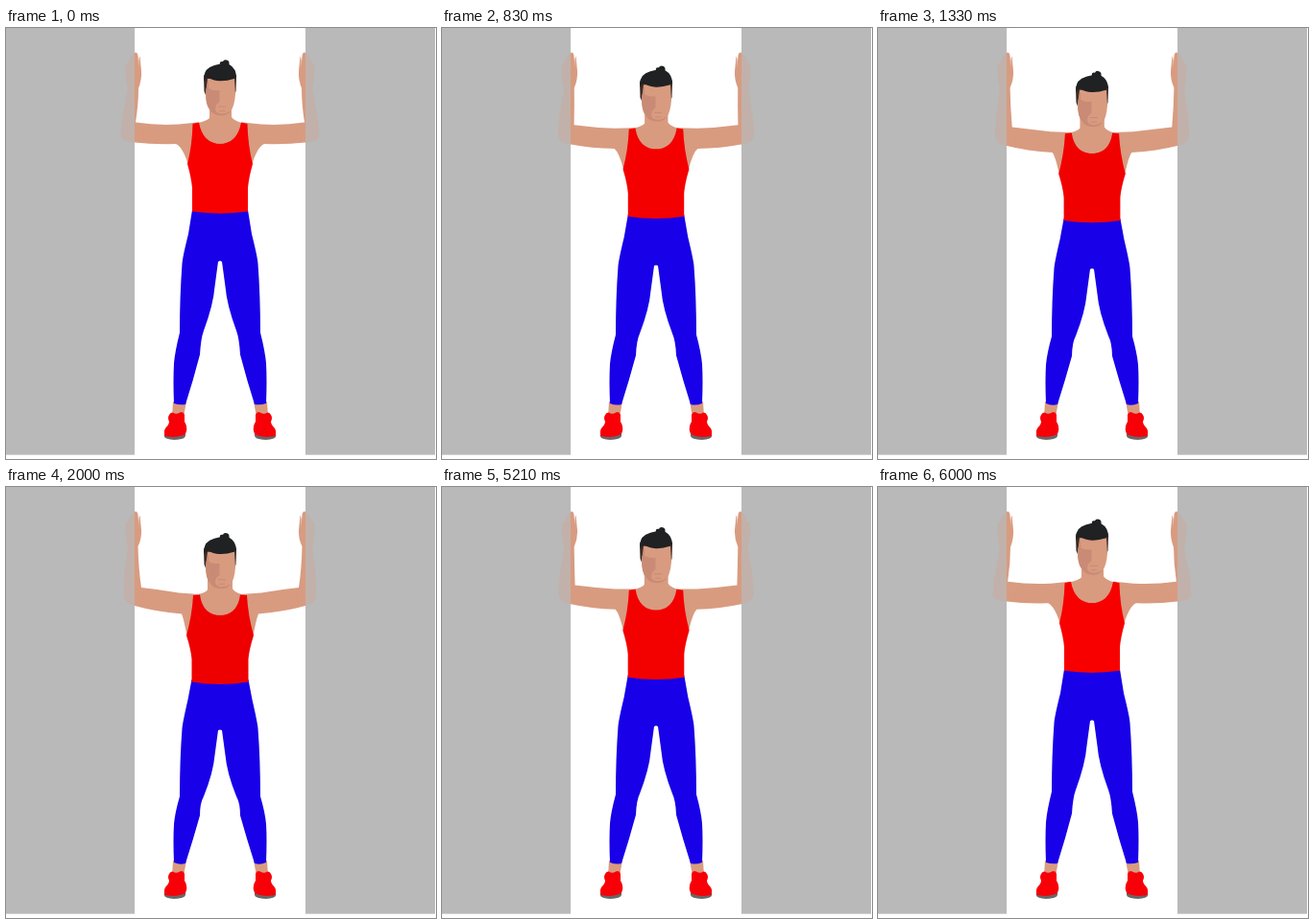
Animation of 448 by 450 pixels, one loop 6.04 s. Source, as an HTML page:

```html
<!DOCTYPE html>
<html lang="en">
<head>
<meta charset="utf-8">
<title>Doorway stretch</title>
<style>
html, body { margin: 0; width: 100%; height: 100%; overflow: hidden; background: #fff; }
svg { display: block; width: 448px; height: 450px; }
.skin { fill: #d89b80; }
.shade { fill: #c98b75; }
.hair { fill: #1f2122; }
.side { fill: #3a2a24; }
.wall { fill: #b9b9b9; }
.pants { fill: #1800e8; }
.shoe { fill: #f80008; }
.sole { fill: #6a6668; }
</style>
</head>
<body>
<svg viewBox="0 0 448 450">
  <defs>
    <path id="walls" class="wall" d="M0 0H134V445.5H0ZM312 0H447V445.5H312Z"/>
    <g id="half">
      <path id="arm" class="skin"/>
      <path class="skin" d="M174 390L188 390 185 406H173Z"/>
      <path class="sole" d="M165 424L187 423Q188 428 183 429Q173 431 167 428.5Q164 427 165 424Z"/>
      <path class="shoe" d="M170 404Q171 401 174 401.5Q177 404 181 401.5Q185 400 186 404L186 411Q189 416 188 421Q187 425 183 425.5Q177 428 165.5 426Q164 421 166 418Q170 414 170 411Q168 407 170 404Z"/>
      <path id="leg" class="pants"/>
      <path id="top"/>
    </g>
  </defs>
  <use href="#walls"/>
  <path id="neck" class="skin"/>
  <use href="#half"/>
  <use href="#half" transform="matrix(-1 0 0 1 446 0)"/>
  <use href="#walls" opacity=".74"/>
  <g id="head">
    <path class="side" d="M206 51Q206 44 223 43Q240 44 240 51L239.5 66L238 70H208L206.5 66Z"/>
    <path class="skin" d="M208 68L210 53H238L239 69Q238 82 234 87Q230 91.5 224 91.5Q216 91.5 212 85Q208 80 208 68Z"/>
    <path class="shade" d="M208 66L211 54V63Q216 66 222.500 65V77L219 80H222V87H234Q230 91.500 224 91.500Q216 91.500 212 85Q208 80 208 66Z"/>
    <path class="skin" d="M219 80H229Q235 81 234 86Q230 89.500 224 89.500Q219 89 218 85Z"/>
    <path d="M221 82H229M222 86.500H228" stroke="#c78a74" fill="none"/>
    <path class="hair" d="M206.500 52Q206 42 217 39L223 37.500Q222 34.500 226 35Q227 32.500 230 33.500Q233 34 232.500 38Q240 42 240 52Q238 50 237.500 53Q230 55.500 223 55.300Q215 55 211.500 52Q208 51 206.500 56Z"/>
  </g>
</svg>
<script>
const LOOP = 6040, STEP = 1000 / 24;
const el = id => document.getElementById(id);

// Each part: upright shape, leaning shape.
const parts = {
  arm: [
    "M134.500 25.500Q137 25 137.500 29L138.500 41Q138 30 139.500 29.500L141 45Q141.500 54 138 63Q138 80 135 98.500Q158 102 180 100.500L200 98.500L206 130L190 143Q184 124 177 121Q155 122 134 119.500Q122 119 119.500 113Q119 105 123 85L127 63Q124 52 125 37L128 36Q129 29 131.500 29Z",
    "M134.500 25.500Q137 25 137.500 29L138.500 41Q138 30 139.500 29.500L141 45Q141.500 54 137.500 62Q138 85 141 105Q160 107 180 110.500L201 112L206 144L188.500 155Q185 137 183 132.500Q155 130 134 124Q124 123 123 114Q122 105 124 85L127 63Q124 52 125 37L128 36Q129 29 131.500 29Z"
  ],
  leg: [
    "M194 190L190 215Q184 239 183.500 246Q181 280 181 318Q176 338 175 350Q174 368 175 392Q181 394 187 393Q195 368 202 341Q203 324 206 316Q216 289 217.500 270L221 244L224 242.500V190Z",
    "M193.500 201L189.500 222Q184 246 183.500 252Q181 285 181 323Q176 340 175 352Q174 368 175 392Q181 395 187 393Q195 368 202 343Q202 330 206 323Q216 298 217.500 280L221 254L224 253V201Z"
  ],
  top: [
    "M194.500 100L201 98.500Q205 121 224 121V193.700Q208 193.500 194 191.500V167Q193 156 189 142Q194 122 194.500 100Z",
    "M195 113L202 112.500Q205 134 224 134V206Q208 206 193.500 203.500V180Q193 171 188 155Q194 133 195 113Z"
  ],
  neck: [
    "M212 75H235V93Q238 97 246 99L252 103V130H194V103L200 99Q209 97 212 94Z",
    "M210 90H236V106Q238 110 246 112L252 115V142H194V115L200 112Q209 110 210 107Z"
  ]
};

const mix = (a, b, p) => a + (b - a) * p;

function blend([a, b], p) {
  const end = b.match(/[\d.]+/g);
  let i = 0;
  return a.replace(/[\d.]+/g, n => mix(+n, +end[i++], p).toFixed(2));
}

// Share of a move that is done, advancing at 24 steps a second.
function done(t, start, steps) {
  const k = Math.floor((t - start + 4) / STEP) + 1;
  return Math.min(1, Math.max(0, k / steps));
}

function lean(t) {
  if (t < 290) return 0;
  if (t < 4750) return Math.sin(Math.PI / 2 * done(t, 290, 42) ** 1.15);
  return (1 - done(t, 4750, 32)) ** 1.1;
}

function draw(t) {
  const p = lean(t);
  for (const id in parts) el(id).setAttribute("d", blend(parts[id], p));
  el("top").setAttribute("fill", `rgb(${Math.round(mix(248, 239, p))},0,0)`);
  el("head").setAttribute("transform", `translate(0 ${mix(0, 14.8, p).toFixed(2)})`);
}

const begin = performance.now();
function tick() {
  draw((performance.now() - begin) % LOOP);
  requestAnimationFrame(tick);
}
draw(0);
requestAnimationFrame(tick);
</script>
</body>
</html>
```
